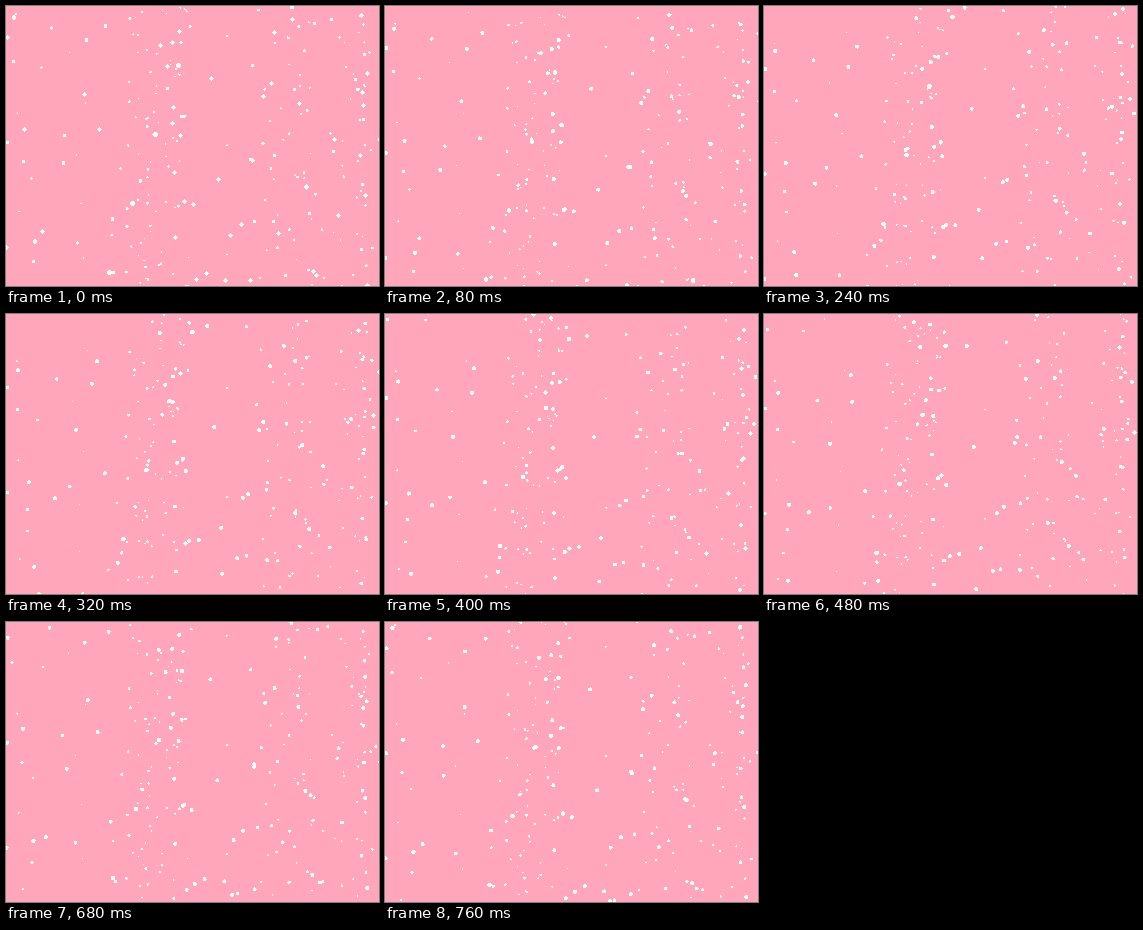
An HTML page with a canvas that plays this animation: 373 by 280 pixels, repeating every 800 ms.

```html
<!DOCTYPE html>
<html lang="en">
<head>
<meta charset="utf-8">
<title>Snow</title>
<style>
  html, body { margin: 0; width: 100%; height: 100%; overflow: hidden; background: #ffa6ba; }
  canvas { display: block; }
</style>
</head>
<body>
<canvas id="stage" width="373" height="280"></canvas>
<script>
const W = 373, H = 280, LOOP = 800, STEP = 40;
const ctx = document.getElementById('stage').getContext('2d');

// A stream is a line of flakes; each flake reaches the next one's place in one loop.
// x, y, drift and fall per loop, radius
const streams = [
  [78, 88, -21, 68.5, 2], [93, 123, 13, 89.5, 2], [205, 72, 7, 101, 2],
  [265, 77, -20.5, 76, 2], [168, 166, 1, 65, 2], [172, 59, -23, 69, 2.3],
  [161, 60, 13, 69, 2], [173, 25, 2.5, 85, 2], [257, 90, -11, 64, 2],
  [293, 97, 7, 84, 2], [190, 273, 12, 78, 2], [361, 67, 15, 85, 2],
  [354, 149, -22, 60, 2], [357, 113, -1, 65, 1.8], [355, 9, 2, 90, 2],
  [18, 123, 10.5, 112, 2.1], [7, 55, 10, 100, 1.8], [1, 31, -0.5, 105, 2],
  [58, 129, 13, 107.5, 1.8], [35, 61, -10, 111, 1.3], [134, 174, -13.5, 46, 1.7],
  [300, 180, -28, 47, 2], [248, 215, -20, 66, 1.8], [351, 83, -24, 62, 1.7],
  [246, 59, 10.5, 78, 1.6], [325, 13, 24, 60, 1.6]
];

let seed = 17;
function random() {
  seed = (seed * 16807) % 2147483647;
  return seed / 2147483647;
}

// Fine flakes, denser around a few columns
const columns = [50, 130, 162, 255, 300, 358];
for (let i = 0; i < 45; i++) {
  const spread = (random() + random() - 1) * 24;
  const x = i % 3 ? columns[i % columns.length] + spread : random() * W;
  streams.push([x, random() * H, (random() - 0.5) * 20, 60 + random() * 50, 0.6 + random() * 0.8]);
}

// Hard-edged dot
function dot(x, y, r) {
  for (let py = Math.floor(y - r); py <= y + r; py++) {
    for (let px = Math.floor(x - r); px <= x + r; px++) {
      if (Math.hypot(px - x, py - y) <= r) ctx.fillRect(px, py, 1, 1);
    }
  }
}

function draw(now) {
  const phase = Math.floor((now % LOOP) / STEP) * STEP / LOOP;
  ctx.fillStyle = '#ffa6ba';
  ctx.fillRect(0, 0, W, H);
  ctx.fillStyle = '#fff';
  for (const [x, y, drift, fall, r] of streams) {
    const first = Math.floor(-y / fall) - 1;
    for (let k = first; y + fall * k < H + r; k++) {
      dot(x + drift * (k + phase), y + fall * (k + phase), r);
    }
  }
}

const start = performance.now();
function tick() {
  draw(performance.now() - start);
  requestAnimationFrame(tick);
}
tick();
</script>
</body>
</html>
```
